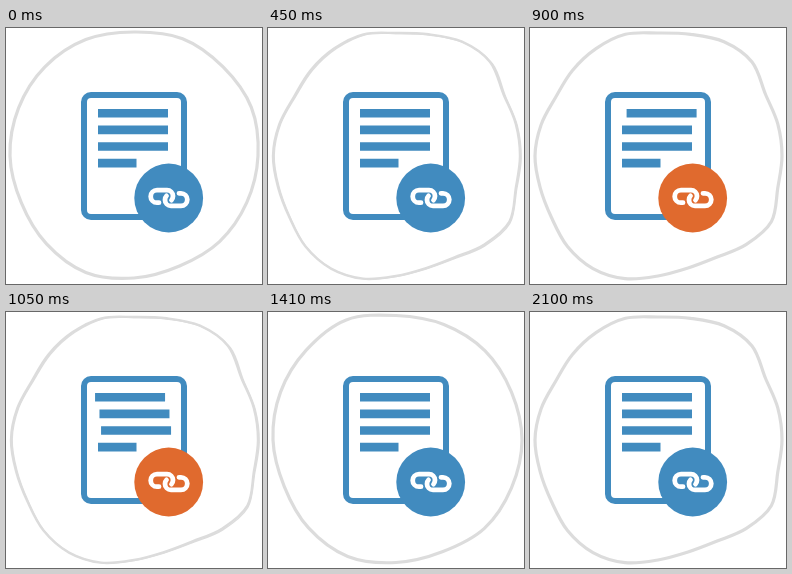
Write an HTML page that moves like this. It is 256 px wide and 256 px high and loops after 2.25 s.

```html
<!DOCTYPE html>
<html lang="en">
<head>
<meta charset="utf-8">
<style>
  html, body { margin: 0; height: 100%; overflow: hidden; background: #fff; }
  svg { display: block; width: 100%; height: 100%; }
</style>
</head>
<body>
<svg viewBox="0 0 256 256" fill="none">
  <g stroke="#dcdcdc">
    <path id="blob"/>
    <path id="echo" stroke-width="1.4" transform="rotate(.7 128 128) translate(1.2 .6)"/>
  </g>
  <rect x="78" y="67" width="100" height="122" rx="7" stroke="#418bbf" stroke-width="6"/>
  <path id="lines" stroke="#418bbf" stroke-width="8.6"/>
  <circle id="badge" cx="162.7" cy="170" r="34.4"/>
  <g id="link" stroke="#fff" stroke-width="4.8" stroke-linecap="round">
    <path id="half" d="M153 174.7h-2a6.3 6.3 0 0 1 0-12.6h10a6 6 0 0 1 6 6q0 2.5-1.5 4"/>
    <use href="#half" transform="rotate(180 163 170)"/>
  </g>
</svg>
<script>
const LOOP = 2250, STEP = 30, POSE = 150, SHAKE = 210;
const BLUE = [65, 139, 191], ORANGE = [224, 106, 46];
const lineStarts = [861, 955, 1028, 1103];
const linkStart = 1190, linkAngle = 22;
const get = id => document.getElementById(id);
const clamp = x => Math.max(0, Math.min(1, x));

// Closed smooth curve through radii at equal angles, clockwise from the right
function smooth(radii) {
  const n = radii.length;
  const at = i => {
    const angle = 2 * Math.PI * i / n, r = radii[(i + n) % n];
    return [128 + r * Math.cos(angle), 128 + r * Math.sin(angle)];
  };
  let d = 'M' + at(0);
  for (let i = 0; i < n; i++) {
    const [a, b, c, e] = [at(i - 1), at(i), at(i + 1), at(i + 2)];
    d += 'C' + b.map((v, k) => v + (c[k] - a[k]) / 6)
      + ' ' + c.map((v, k) => v - (e[k] - b[k]) / 6) + ' ' + c;
  }
  return d + 'Z';
}

const round = smooth([124, 122, 121, 119, 122, 126, 124, 122, 124, 125, 126, 126, 124, 127, 126, 127]);
const tilted = smooth([126, 125, 125, 121, 122.5, 126, 124, 121, 123, 125, 127, 130, 124.5, 125, 126, 125]);
const bumpy = smooth([124, 124, 131, 125, 117, 116, 120, 127, 130, 128, 123, 122,
  123, 121, 118, 121, 124, 126, 123, 126, 132, 133, 124, 124]);
const blobs = [round, tilted, bumpy, bumpy];

function swing(t, start) {
  return Math.sin(2 * Math.PI * clamp((t - start) / SHAKE));
}

function draw(time) {
  const t = Math.floor(time % LOOP / STEP) * STEP;
  const pose = Math.floor(t / POSE) % 4, doubled = pose === 3;
  get('blob').setAttribute('d', blobs[pose]);
  get('blob').setAttribute('stroke-width', doubled ? 2.4 : 3.2);
  get('echo').setAttribute('d', doubled ? bumpy : '');

  const heat = clamp(Math.min(t - 720, 1410 - t) / 90);
  const rgb = BLUE.map((c, i) => Math.round(c + (ORANGE[i] - c) * heat));
  get('badge').setAttribute('fill', `rgb(${rgb})`);

  get('lines').setAttribute('d', lineStarts.map((start, i) => {
    const last = i === 3, x = 92 + (last ? -5 : 5) * swing(t, start);
    return `M${x} ${85.3 + 16.6 * i}h${last ? 38.5 : 70}`;
  }).join(''));
  get('link').setAttribute('transform', `rotate(${linkAngle * swing(t, linkStart)} 163 170)`);
}

const begin = performance.now();
function frame() {
  draw(performance.now() - begin);
  requestAnimationFrame(frame);
}
frame();
</script>
</body>
</html>
```
